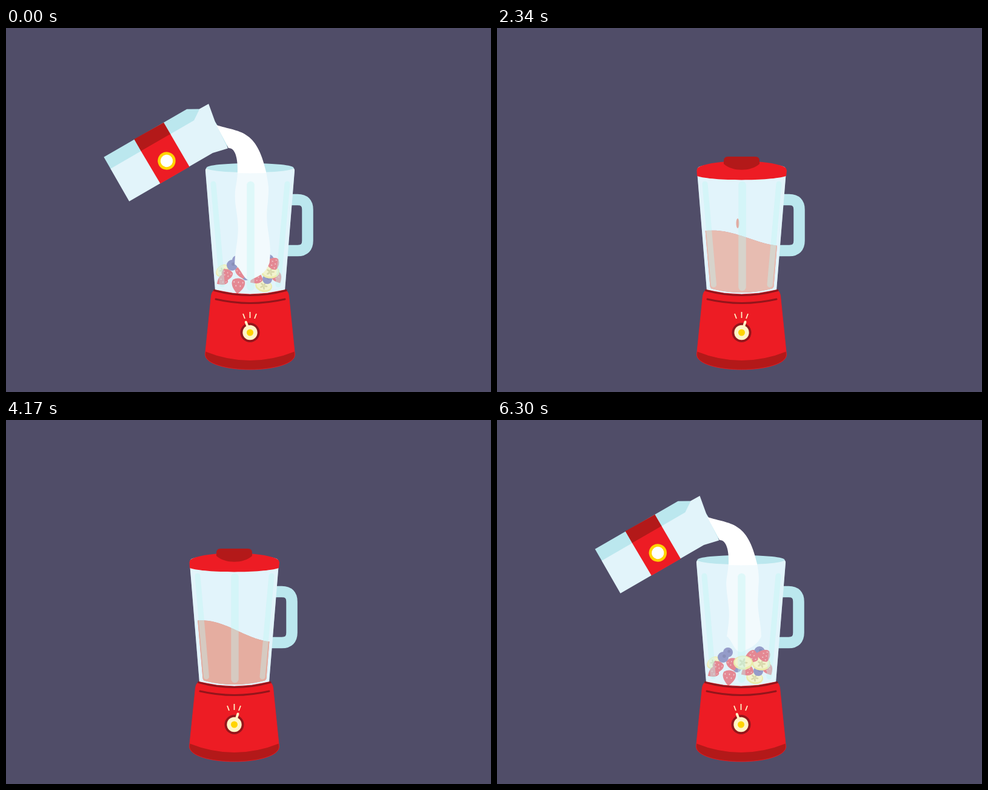
These frames come from a looping animation (800x600 px, 6.33 s). An HTML page with a canvas:

```html
<!DOCTYPE html>
<html lang="en">
<head>
<meta charset="utf-8">
<title>Blender</title>
<style>
html, body { margin: 0; width: 100%; height: 100%; overflow: hidden; background: #504d68; }
canvas { display: block; }
</style>
</head>
<body>
<canvas id="stage" width="800" height="600"></canvas>
<script>
const c = document.getElementById('stage').getContext('2d');
const LOOP = 6330, STEP = 30, CX = 402.5;
const BG = '#504d68', RED = '#ed1c24', DARK = '#b31919', LINE = '#94151b';
const GLASS = '#e2f4fa', AQUA = '#bbe7ee', CREAM = '#fff4c6', GOLD = '#ffd400';
const MILK = [255, 255, 255], SHAKE = [231, 115, 86];

const clamp = v => Math.max(0, Math.min(1, v));
const mix = (a, b, k) => a + (b - a) * k;
const span = (t, a, b) => clamp((t - a) / (b - a));
const ease = k => k * k * (3 - 2 * k);
const rgb = (a, b, k) => `rgb(${a.map((v, i) => Math.round(mix(v, b[i], k)))})`;

function fill(path, color) { c.fillStyle = color; c.fill(path); }
function stroke(path, color, width, cap = 'round') {
  c.strokeStyle = color; c.lineWidth = width; c.lineCap = cap; c.stroke(path);
}
function shape(d, color) { fill(new Path2D(d), color); }
function line(d, color, width, cap) { stroke(new Path2D(d), color, width, cap); }
function oval(x, y, rx, ry, color, rot = 0) {
  c.beginPath(); c.ellipse(x, y, rx, ry, rot, 0, 7);
  c.fillStyle = color; c.fill();
}
function scoped(draw) { c.save(); draw(); c.restore(); }

const jar = new Path2D('M329 236Q328 231 334 229A73 8 0 0 1 471 229Q477 231 476 236L460 432Q402.5 448 345 432Z');
const front = new Path2D('M329 234A73.5 5.5 0 0 0 476 234L460 432Q402.5 448 345 432Z');
const inside = new Path2D('M334 235L350.5 426Q351 429 354 430Q402.5 442 451 430Q455 429 455.5 426L471 235Z');
const base = new Path2D('M338.5 441Q340 432 346 432Q402.5 446 459 432Q465 432 466.5 441L476.5 538C477 554 440 563 402.5 563C365 563 328 554 328.5 538Z');

// kind, x, y, size, turn
const fruits = [
  ['banana', 425, 425, 14, 0.2], ['berry', 383, 424, 12, 0.1], ['banana', 357, 400, 12, -0.7],
  ['berry', 357, 416, 9, 1], ['blue', 431, 414, 8, 0], ['berry', 364, 407, 10, 0.4],
  ['berry', 447, 411, 9, -0.5], ['blue', 396, 409, 7, 0], ['banana', 436, 402, 15, 0],
  ['berry', 413, 413, 10, 1], ['blue', 381, 383, 8, 0], ['berry', 388, 402, 10, -0.3],
  ['blue', 373, 391, 9, 0], ['blue', 433, 382, 9, 0], ['berry', 420, 390, 11, 1.2],
  ['berry', 440, 388, 11, 1.8], ['banana', 406, 400, 16, 0]
];

function fruit([kind, x, y, s, turn], drop) {
  scoped(() => {
    c.translate(x, y - drop);
    c.rotate(turn + drop / 160);
    if (kind === 'blue') {
      oval(0, 0, s, s, '#5553a0');
      oval(s * 0.2, -s * 0.2, s * 0.3, s * 0.3, '#3f3c83');
    } else if (kind === 'berry') {
      c.scale(s / 10, s / 10);
      shape('M-8-7Q0-12 8-7Q12 1 0 12Q-12 1-8-7Z', '#e5303e');
      for (let i = 0; i < 5; i++) oval(i * 3 - 6, i % 2 * 5 - 4, 0.8, 1.2, '#f7a0a4');
    } else {
      oval(0, 0, s, s * 0.72, '#f1e36a');
      oval(0, -1, s * 0.86, s * 0.58, '#fff2a9');
      for (let i = 0; i < 5; i++) {
        const a = i * Math.PI * 0.4;
        oval(Math.cos(a) * s * 0.25, Math.sin(a) * s * 0.25, s * 0.22, s * 0.1, '#cfc06a', a);
      }
    }
  });
}

function drawFruits(t) {
  if (t > 2100 && t < 5400) return;
  fruits.forEach((f, i) => {
    const d = t > 5000 ? Math.max(0, 5660 + i * 22 - t) : 0;
    fruit(f, 1.2 * d + 0.002 * d * d);
  });
}

function cartonPose(t) {
  if (t < 1740) {
    const back = ease(span(t, 330, 960)), k = 1.25 * span(t, 1450, 1740) ** 3;
    const sway = Math.sin(Math.PI * span(t, 0, 600));
    return [mix(265, 249, back) - 5 * sway - 150 * k, mix(219, 221, back) - 2 * sway + 70 * k, 1.002 * (1 - back)];
  }
  if (t < 5360) return null;
  const k = (1 - span(t, 5400, 5800)) ** 3, tilt = ease(span(t, 5620, 6060));
  const far = t < 5400 ? ((5800 - t) / 400) ** 3 : k;
  return [mix(249, 265.3, tilt) - 149 * far, mix(221, 219, tilt) + 62 * Math.min(far, 1.03), 1.002 * tilt];
}

function drawCarton(t) {
  const pose = cartonPose(t);
  if (!pose) return;
  scoped(() => {
    c.beginPath(); c.rect(99, 0, 800, 600); c.clip();
    c.translate(pose[0], pose[1]);
    c.rotate(pose[2]);
    c.translate(-249, -221);
    shape('M236 119L268 119L286 125L260 128Z', AQUA);
    shape('M195 147L207 128L218 147L211 306L188 305Z', AQUA);
    shape('M207 112L238 119L286 125L279 150L272 309L210 306L217 147L206 129Z', GLASS);
    shape('M193 191L216 192L213 248L190 247Z', DARK);
    shape('M215 192L277.5 194.5L275 250L212.5 248Z', RED);
    oval(249, 221, 14.7, 14.7, GOLD);
    oval(249, 221, 10.2, 10.2, '#fff');
  });
}

function drawStream(t) {
  const s = t > 3000 ? t - LOOP : t;
  if (s < -240 || s > 700) return;
  const tip = Math.min(430, 418 + s * 1.1), tail = s > 400 ? 155 + (s - 400) ** 2 * 0.004 : 0;
  const end = Math.max(tip, 265) - 28;
  const wave = (y, p) => 2.8 * Math.sin(y / 19 - s / 55 + p) * clamp((y - 237) / 30);
  scoped(() => {
    c.beginPath(); c.rect(0, tail, 800, Math.max(0, tip + 3 - tail)); c.clip();
    c.beginPath();
    c.moveTo(347, 160);
    c.bezierCurveTo(385, 172, 413, 166, 429, 237);
    for (let y = 237; y <= end; y += 6) c.lineTo(429 + 4 * clamp((y - 237) / 50) + wave(y, 1), y);
    c.bezierCurveTo(427, tip - 10, 412, tip - 8, 405, tip - 3);
    c.bezierCurveTo(393, tip + 1, 390, tip - 18, 381 + wave(end, 3), end);
    for (let y = end; y >= 237; y -= 6) c.lineTo(382 - 2 * clamp((y - 237) / 50) + wave(y, 3), y);
    c.bezierCurveTo(383, 212, 377, 197, 367, 198);
    c.closePath();
    c.fillStyle = '#fff'; c.fill();
  });
}

function liquid(t, top, color) {
  c.beginPath();
  c.moveTo(325, 450);
  for (let x = 330; x <= 476; x += 3) c.lineTo(x, top(clamp((x - 342) / 121)));
  c.lineTo(480, 450);
  c.closePath();
  c.fillStyle = color; c.fill();
}

function drawLiquid(t) {
  if (t < 40 || t > 4600) return;
  const level = t < 690 ? mix(436, 380, span(t, 40, 690)) : mix(380, 367, ease(span(t, 690, 880)));
  const stir = ease(span(t, 1920, 2250));
  const swing = Math.cos((t - 3060) * 2 * Math.PI / 444);
  const ripple = 2.5 * (1 - span(t, 650, 1300));
  const top = u => {
    const arc = Math.sin(Math.PI * u);
    const calm = level + 8 * arc + ripple * Math.sin(u * 11 - t / 70);
    const wild = 343 - 5 * swing + (16.3 * swing - 1.2 * swing * swing) * Math.cos(Math.PI * u) - (6 + 3 * swing) * arc;
    return mix(calm, wild, stir);
  };
  const color = rgb(MILK, SHAKE, ease(span(t, 1920, 2500)));
  scoped(() => {
    c.clip(inside);
    if (t > 450 && t < 2200) {
      const y = level + 8 - 26 * stir;
      oval(391, y, 8, 8, '#e5303e');
      oval(413, y + 1, 9, 8, '#e5303e');
      oval(403, y, 6, 6, '#5553a0');
      oval(424, y + 1, 5, 3, '#5553a0');
    }
    if (stir > 0) {
      const lift = 6 * Math.max(0, swing) * stir;
      liquid(t, u => top(u) - lift * Math.sin(Math.PI * clamp(u * 1.5)), rgb([235, 235, 245], [186, 74, 74], stir));
    }
    liquid(t, top, color);
    if (t > 1950 && t < 3870) {
      const n = (t - 1890) / 360, k = Math.floor(n), p = n - k;
      oval(350 + k * 46 % 104, 340 - 96 * p * (1 - p), 2.5, 8, '#df6f59');
    }
  });
}

function drawLid(t) {
  if (t < 1260 || t > 4600) return;
  const rise = 178 * Math.max(0, (1500 - t) / 210) ** 3;
  scoped(() => {
    c.translate(0, -rise);
    shape('M328.5 235Q328 229 340 226C370 217 435 217 465 226Q477 229 477 235L476 244C450 252.5 355 252.5 329 244Z', RED);
    shape('M373 219Q373 212 380 212H425Q432 212 432 219V224C418 237 387 237 373 224Z', DARK);
  });
}

function drawDial(t) {
  line('M391 471L394 479M402.5 468V478M413 471L410 479', CREAM, 1.8, 'butt');
  const turn = t < 4600 ? mix(-21.5, 19, ease(span(t, 1920, 2070))) : -21.5;
  oval(CX, 502, 16, 16, LINE);
  scoped(() => {
    c.translate(CX, 502);
    c.rotate(turn * Math.PI / 180);
    line('M0-8V-18.5', CREAM, 4);
  });
  oval(CX, 502, 12.2, 12.2, CREAM);
  oval(CX, 502, 5.5, 5.5, GOLD);
}

function drawBase(t) {
  fill(base, RED);
  scoped(() => {
    c.clip(base);
    shape('M320 530L328 533Q402.5 563 477 533L485 530V570H320Z', DARK);
  });
  stroke(base, RED, 0.8);
  line('M343.5 432.5Q402.5 448.5 462 432.5', LINE, 3);
  line('M346 447Q402.5 460 460 447', LINE, 3);
  drawDial(t);
}

function drawJar(t) {
  line('M462 283H481Q497.5 283 497.5 299.5V350.5Q497.5 367 481 367H455', AQUA, 18.5, 'butt');
  fill(jar, GLASS);
  oval(CX, 230.5, 72, 7.7, AQUA);
  drawFruits(t);
  drawStream(t);
  drawLiquid(t);
  scoped(() => {
    c.globalAlpha = 0.45;
    fill(front, GLASS);
    c.globalAlpha = 0.4;
    const tint = 'rgb(190,246,243)';
    line('M342 257L356.5 423M464 257L449 423', tint, 9);
    line('M403.5 259V427', tint, 12.5);
  });
}

function shift(t) {
  if (t < 1920) return 0;
  if (t < 3960) return Math.sin((t - 3060) / 17);
  if (t < 4530) return -26 * ((t - 3960) / 210) ** 3;
  return 457 * Math.max(0, (5602 - t) / 862) ** 3;
}

function draw(t) {
  c.fillStyle = BG;
  c.fillRect(0, 0, 800, 600);
  if (t >= 4530 && t < 4740) return;
  scoped(() => {
    c.translate(shift(t), 0);
    drawCarton(t);
    drawJar(t);
    drawBase(t);
    drawLid(t);
  });
}

const start = performance.now();
function tick() {
  const t = (performance.now() - start) % LOOP;
  draw(Math.floor(t / STEP) * STEP);
  requestAnimationFrame(tick);
}
tick();
</script>
</body>
</html>
```
